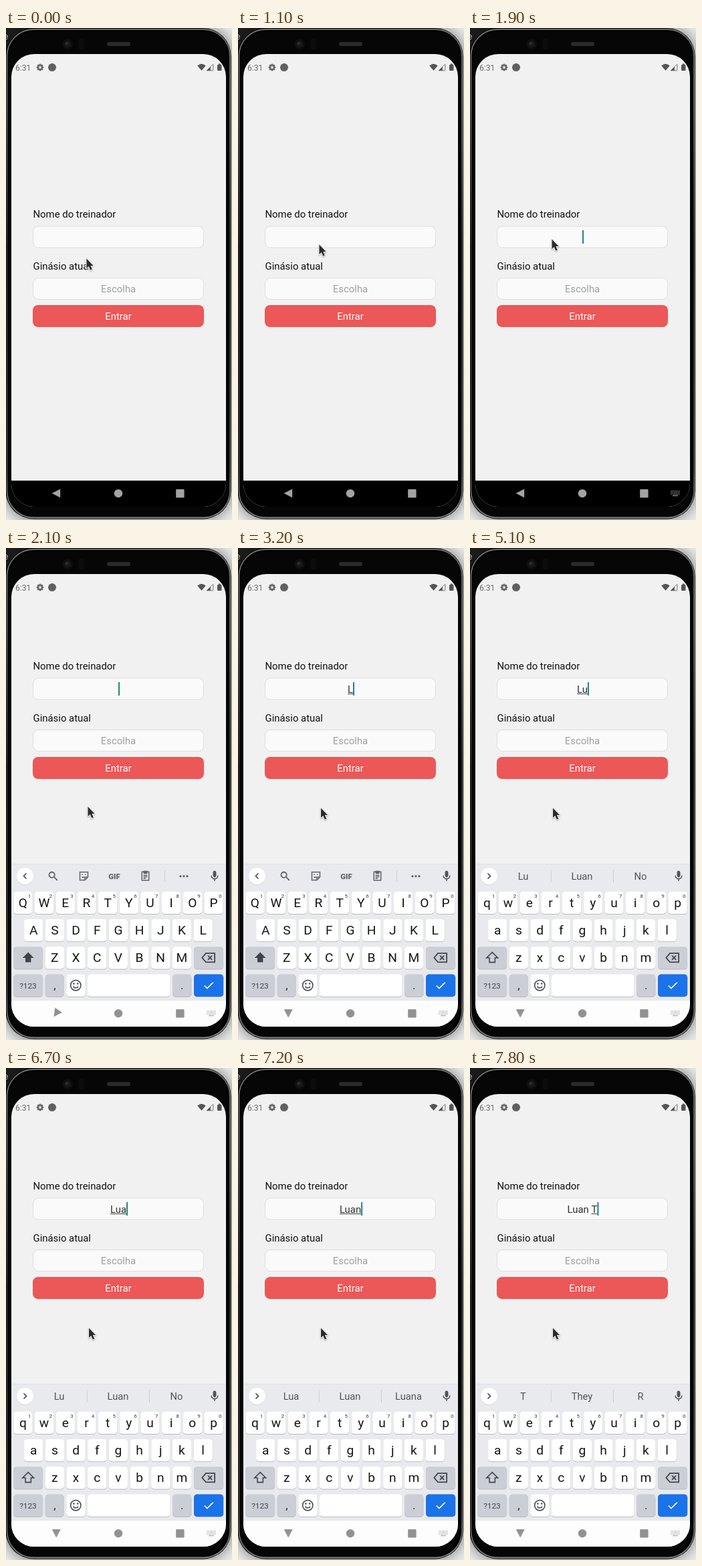
An HTML page with a canvas for the animation above (8000 ms loop, 338x737 px).

```html
<!DOCTYPE html>
<html lang="pt">
<head>
<meta charset="utf-8">
<title>Login</title>
<style>
  html, body { margin: 0; width: 100%; height: 100%; overflow: hidden; background: #000; }
  canvas { display: block; width: 338px; height: 737px; }
</style>
</head>
<body>
<canvas id="stage"></canvas>
<script>
const W = 338, H = 737, LOOP = 8000;
const canvas = document.getElementById('stage');
const ratio = window.devicePixelRatio || 1;
canvas.width = W * ratio;
canvas.height = H * ratio;
const c = canvas.getContext('2d');

// Each step overrides part of the state from its time onwards.
const steps = [
  [0, { mouse: [120, 345], caret: false, imeIcon: false, keyboard: false, backTurn: 0,
        done: '', typing: '', upper: true, words: null }],
  [800, { mouse: [119, 338] }],
  [1100, { mouse: [121, 324] }],
  [1300, { mouse: [122, 316] }],
  [1700, { caret: true }],
  [1900, { imeIcon: true }],
  [2100, { keyboard: true, backTurn: 55, mouse: [122, 387] }],
  [2300, { backTurn: 90, mouse: [123.5, 389] }],
  [2900, { caret: false }],
  [3200, { caret: true, typing: 'L' }],
  [3400, { upper: false, words: ['L', 'La', 'Lo'] }],
  [3600, { typing: 'Lu' }],
  [3800, { words: ['Lu', 'Luan', 'No'] }],
  [4400, { typing: 'Lus' }],
  [4600, { words: ['Lus', 'Luz', 'Luso'] }],
  [5100, { typing: 'Lu', words: ['Lu', 'Luan', 'No'] }],
  [5700, { caret: false }],
  [6100, { caret: true }],
  [6500, { typing: 'Lua' }],
  [6900, { words: ['Lua', 'Luan', 'Luas'] }],
  [7200, { typing: 'Luan', words: ['Lua', 'Luan', 'Luana'] }],
  [7400, { done: 'Luan ', typing: '', words: ['e', 'de', 'da'] }],
  [7600, { typing: 'T' }],
  [7800, { words: ['T', 'They', 'R'] }]
];

const stateAt = t => Object.assign({}, ...steps.filter(s => s[0] <= t).map(s => s[1]));

function box(x, y, w, h, r, fill, stroke, line = 1) {
  c.beginPath();
  c.roundRect(x, y, w, h, r);
  if (fill) { c.fillStyle = fill; c.fill(); }
  if (stroke) { c.strokeStyle = stroke; c.lineWidth = line; c.stroke(); }
}

function disc(x, y, r, fill) {
  c.beginPath();
  c.arc(x, y, r, 0, Math.PI * 2);
  c.fillStyle = fill;
  c.fill();
}

function text(str, x, y, size, color, align = 'center', weight = 400) {
  c.font = `${weight} ${size}px Roboto, sans-serif`;
  c.textAlign = align;
  c.fillStyle = color;
  c.fillText(str, x, y);
}

// Paths are drawn on a 24-unit grid centred on (x, y).
function icon(path, x, y, size, color, line = 0, turn = 0) {
  c.save();
  c.translate(x, y);
  c.rotate(turn * Math.PI / 180);
  c.scale(size / 24, size / 24);
  c.translate(-12, -12);
  const shape = new Path2D(path);
  if (line) {
    c.strokeStyle = color;
    c.lineWidth = line;
    c.stroke(shape);
  } else {
    c.fillStyle = color;
    c.fill(shape);
  }
  c.restore();
}

function drawPhone() {
  c.fillStyle = '#ececec';
  c.fillRect(0, 0, W, H);
  c.fillStyle = '#202020';
  c.fillRect(0, 0, 60, 400);
  text('e', -3, 17, 12, '#d0d0d0', 'left');
  c.save();
  c.shadowColor = 'rgba(0,0,0,.55)';
  c.shadowBlur = 22 * ratio;
  box(-0.5, 0, 337, 735.5, 42, '#050505');
  c.restore();
  const metal = c.createLinearGradient(0, 0, 0, H);
  metal.addColorStop(0, '#6c6c6c');
  metal.addColorStop(0.15, '#666');
  metal.addColorStop(0.45, '#2c2c2c');
  metal.addColorStop(0.9, '#444');
  metal.addColorStop(1, '#8a8a8a');
  box(1.5, 2, 333.5, 731.5, 40, null, metal, 1.8);
  box(5, 6, 326.5, 723, 36, '#060606');
  disc(92, 24, 8, '#0e0e0e');
  disc(92, 24, 5, '#17181b');
  disc(91, 23.5, 2, '#2c2f34');
  box(108, 16, 9, 16, 3, '#0c0c0c');
  box(151, 21, 35, 6, 3, '#2b2b2b');
}

function drawStatus() {
  const gray = '#6a6a6a';
  text('6:31', 14, 63.5, 12, gray, 'left');
  for (let i = 0; i < 4; i++) {
    c.save();
    c.translate(51, 59);
    c.rotate(i * Math.PI / 4);
    c.fillStyle = gray;
    c.fillRect(-1.3, -5.3, 2.6, 10.6);
    c.restore();
  }
  disc(51, 59, 4.2, gray);
  disc(51, 59, 1.8, '#f1f1f1');
  disc(69, 59, 6, '#5f5f5f');
  icon('M12 22L0 8Q12-2 24 8Z', 292.5, 58.5, 12.5, '#555');
  icon('M2 22H22V2Z', 305, 59, 11.5, '#777', 2);
  icon('M2 22H14V10Z', 305, 59, 11.5, '#555');
  box(316, 55, 6.5, 9, 1, '#555');
  box(317.8, 53.5, 3, 2, 0, '#555');
}

function drawField(s) {
  box(40.5, 297, 255, 32, 8, '#fafafa', '#dedede');
  c.font = '400 14.9px Roboto, sans-serif';
  const doneWidth = c.measureText(s.done).width;
  const width = c.measureText(s.done + s.typing).width;
  const left = 168 - width / 2;
  text(s.done + s.typing, left, 319, 14.9, '#303030', 'left');
  if (s.typing) {
    c.fillStyle = '#444';
    c.fillRect(left + doneWidth, 320, width - doneWidth, 1);
  }
  if (s.caret) {
    c.fillStyle = '#24857b';
    c.fillRect(left + width, 303, 2, 20);
  }
}

function drawForm(s) {
  c.save();
  if (s.keyboard) c.translate(0, -102);
  text('Nome do treinador', 40.5, 284, 14.9, '#111', 'left');
  drawField(s);
  text('Ginásio atual', 40.5, 361.5, 14.9, '#111', 'left');
  box(40.5, 374.5, 255, 32, 8, '#fafafa', '#dedede');
  text('Escolha', 168, 396, 14.9, '#a0a0a0');
  box(40, 415, 256, 33, 8, '#ec5757');
  text('Entrar', 168, 437, 14.9, '#fff');
  c.restore();
}

function key(x, y, w, fill = '#fff') {
  box(x, y + 1, w, 33.3, 4.5, '#b9bcc2');
  box(x, y, w, 33.3, 4.5, fill);
}

function drawToolbar(s) {
  const ink = '#5f6368';
  disc(28.5, 492.3, 12.7, '#d5d7da');
  disc(28.5, 491.5, 12.5, '#fff');
  icon(s.words ? 'M9 6l6 6-6 6' : 'M15 6l-6 6 6 6', 28.5, 491.5, 16, '#444', 2.4);
  icon('M9 5V11A3 3 0 0 0 15 11V5A3 3 0 0 0 9 5Z', 312, 491.5, 19.5, '#505357');
  icon('M6 11A6 6 0 0 0 18 11M12 17V21', 312, 491.5, 19.5, '#505357', 2);
  c.fillStyle = '#cfd1d5';
  if (s.words) {
    c.fillRect(121, 482, 1, 19);
    c.fillRect(214, 482, 1, 19);
    [79.5, 167.5, 255].forEach((x, i) => text(s.words[i], x, 497, 14.7, '#505458'));
    return;
  }
  c.fillRect(237, 483, 1, 17);
  icon('M15 9.5A5.5 5.5 0 1 1 4 9.5A5.5 5.5 0 0 1 15 9.5M13.5 13.5L20.5 20.5', 70.5, 491.5, 18, ink, 2.4);
  icon('M4 4H20V14L14 20H4ZM14 20V14H20M8 9h2M14 9h2M8 13Q10 16 13 14', 116.5, 491.5, 18, ink, 2);
  text('GIF', 162, 495.5, 11.5, ink, 'center', 900);
  icon('M5 4H19V21H5ZM8 11H16M8 14H16M8 17H13', 208.5, 491, 18, ink, 2);
  icon('M8 2H16V8H8Z', 208.5, 491, 18, ink);
  [261, 266, 271].forEach(x => disc(x, 491.7, 1.6, ink));
}

function drawKeyboard(s) {
  const pitch = 31.68, gray = '#cbced5', ink = '#404347';
  const rowTop = row => 514.7 + row * 41.3;
  c.fillStyle = '#e8eaed';
  c.fillRect(8, 473, 321, 205);
  c.fillStyle = '#dfe1e5';
  c.fillRect(8, 473, 321, 1);
  drawToolbar(s);

  [['qwertyuiop', 25.4], ['asdfghjkl', 41.2], ['zxcvbnm', 72.8]]
    .forEach(([letters, first], row) => [...letters].forEach((letter, i) => {
      const x = first + i * pitch, y = rowTop(row);
      key(x - 14.1, y, 28.2);
      text(s.upper ? letter.toUpperCase() : letter, x, y + 22.8, 19.2, '#151515');
      if (row === 0) text((i + 1) % 10, x + 9.7, y + 8.8, 8, '#5f6368', 'center', 500);
    }));

  const y3 = rowTop(2);
  key(11.3, y3, 43.8, gray);
  icon('M12 3L2 13H7V21H17V13H22Z', 33.2, y3 + 15.8, 20, ink, s.upper ? 0 : 1.9);
  key(281, y3, 43.8, gray);
  icon('M8 4.5H23V19.5H8L1.5 12ZM11.5 8.5l7 7M18.5 8.5l-7 7', 302.5, y3 + 16.5, 21, ink, 2);

  const y4 = rowTop(3);
  key(11.3, y4, 43.8, gray);
  text('?123', 33, y4 + 21.2, 11.8, ink);
  key(58.7, y4, 28.2, gray);
  text(',', 72.8, y4 + 22.6, 17, '#222');
  key(90.4, y4, 28.2);
  icon('M21 12A9 9 0 1 1 3 12A9 9 0 0 1 21 12M7.5 14Q12 19 16.5 14', 104.3, y4 + 16.5, 20.5, '#505357', 2);
  disc(101.4, y4 + 14, 1.3, '#505357');
  disc(107.2, y4 + 14, 1.3, '#505357');
  key(122, y4, 123.5);
  key(249.2, y4, 28.2, gray);
  text('.', 263.3, y4 + 22.6, 17, '#222');
  key(281, y4, 44.2, '#1a73e8');
  icon('M4.5 12.5L9.5 17.5L20 7', 303, y4 + 16.5, 20, '#fff', 2);
}

function drawNav(s) {
  c.fillStyle = s.keyboard ? '#fdfdfd' : '#000';
  c.fillRect(8, 678, 321, 40);
  const gray = s.keyboard ? '#929292' : '#a3a3a3';
  icon('M0 12L23 0V24Z', 75.2, 697, 13, gray, 0, -s.backTurn);
  disc(168, 697.2, 6.2, gray);
  box(254.2, 691, 12.4, 12.4, 1, gray);
  if (!s.imeIcon) return;
  c.fillStyle = s.keyboard ? '#b0b0b0' : '#8c8c8c';
  for (let row = 0; row < 3; row++)
    for (let col = 0; col < 6; col++) c.fillRect(300.5 + col * 2.3, 693 + row * 2.3, 1.4, 1.3);
  c.fillRect(303, 699.8, 8, 1.4);
}

function drawMouse([x, y]) {
  c.save();
  c.translate(x, y);
  c.shadowColor = 'rgba(0,0,0,.3)';
  c.shadowBlur = 2;
  c.shadowOffsetY = 1;
  const arrow = new Path2D('M.5 .5V15L3.8 12L6.2 17.6L8.8 16.4L6.4 11H10.6Z');
  c.lineJoin = 'round';
  c.lineWidth = 2;
  c.strokeStyle = '#f4f4f4';
  c.stroke(arrow);
  c.shadowColor = 'transparent';
  c.fillStyle = '#2b2b2b';
  c.fill(arrow);
  c.restore();
}

function draw(t) {
  const s = stateAt(t);
  c.setTransform(ratio, 0, 0, ratio, 0, 0);
  drawPhone();
  c.save();
  c.beginPath();
  c.roundRect(8, 39, 321, 678, 34);
  c.clip();
  c.fillStyle = '#f1f1f1';
  c.fillRect(8, 39, 321, 678);
  drawStatus();
  drawForm(s);
  if (s.keyboard) drawKeyboard(s);
  drawNav(s);
  c.restore();
  drawMouse(s.mouse);
}

const start = performance.now();
function frame() {
  draw((performance.now() - start) % LOOP);
  requestAnimationFrame(frame);
}
frame();
</script>
</body>
</html>
```
